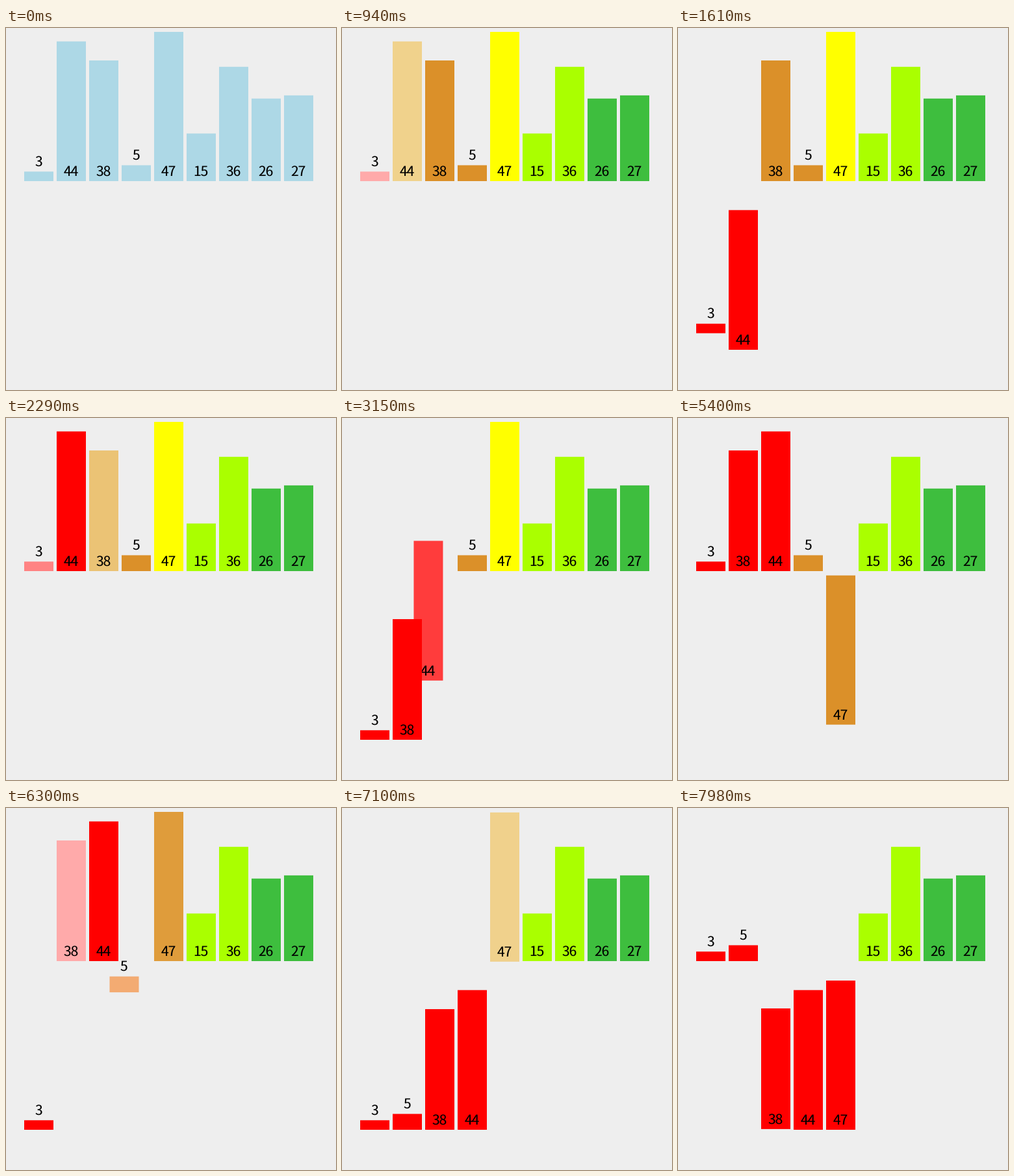
A matplotlib script that plays this animation: 508x558 px, repeating every 8 s.

```python
import numpy as np
import matplotlib.pyplot as plt
from matplotlib.animation import FuncAnimation
from matplotlib.patches import Rectangle

W, H, DPI = 508, 558, 100
LOOP, STEP = 8000, 20
START, MOVE = 345, 292.5  # ms: first transition, length of each transition

BLUE, RED, ORANGE = (173, 216, 230), (255, 0, 0), (219, 144, 41)
YELLOW, LIME, GREEN = (255, 255, 0), (170, 255, 0), (62, 190, 62)
PALE = {RED: (255, 170, 170), ORANGE: (240, 210, 140)}

VALUES = [3, 44, 38, 5, 47, 15, 36, 26, 27]
GROUPS = [RED] + 3 * [ORANGE] + [YELLOW] + 2 * [LIME] + 2 * [GREEN]
BASE, DROP = 236, 260
PITCH, BAR, UNIT = 50, 45, 230 / max(VALUES)

order = list(VALUES)
pose = {v: [slot, 0, BLUE] for slot, v in enumerate(VALUES)}
poses = []


def snapshot():
    poses.append(np.array([[slot, drop, *tone] for slot, drop, tone in pose.values()], float))


def merge(lo, mid, hi):
    tone = pose[order[lo]][2]
    left, right = order[lo:mid], order[mid:hi]

    def highlight():
        for side in (left, right):
            if side:
                head = pose[side[0]]
                head[2] = PALE.get(head[2], head[2])
        snapshot()

    highlight()
    for slot in range(lo, hi):
        take_left = not right or (left and left[0] <= right[0])
        v = (left if take_left else right).pop(0)
        order[slot] = v
        pose[v] = [slot, DROP, tone]
        highlight()
    for v in order[lo:hi]:
        pose[v][1] = 0
        snapshot()


def merge_sort(lo, hi):
    if hi - lo > 1:
        mid = (lo + hi + 1) // 2
        merge_sort(lo, mid)
        merge_sort(mid, hi)
        merge(lo, mid, hi)


snapshot()
for value, tone in zip(VALUES, GROUPS):
    pose[value][2] = tone
snapshot()
merge_sort(0, 5)


def ease(t):
    return 4 * t ** 3 if t < 0.5 else 1 - 4 * (1 - t) ** 3


def shown_time(ms):
    """The picture stands still at first and in a few short pauses."""
    if ms < 500:
        return 0
    for pause in (680, 940, 2100, 4240, 4980, 5810):
        if pause <= ms < pause + 135:
            return pause
    return ms


def pose_at(ms):
    phase = max(0, (shown_time(ms) - START) / MOVE)
    k = int(phase)
    return poses[k] + (poses[k + 1] - poses[k]) * ease(phase - k)


plt.rcParams.update({"font.family": "Noto Sans CJK JP", "text.hinting": "none"})
fig = plt.figure(figsize=(W / DPI, H / DPI), dpi=DPI, facecolor="#eeeeee")
ax = fig.add_axes([0, 0, 1, 1])
ax.set(xlim=(0, W), ylim=(H, 0))
ax.axis("off")

bars, labels = [], []
for z, value in enumerate(VALUES):
    bar = Rectangle((0, 0), BAR, value * UNIT, linewidth=0, snap=False, zorder=2 + z)
    bars.append(ax.add_patch(bar))
    labels.append(ax.text(0, 0, str(value), fontsize=21 * 72 / DPI, color="black",
                          ha="center", va="baseline", zorder=2.5 + z))


def draw(i):
    for bar, label, (slot, drop, *tone) in zip(bars, labels, pose_at(i * STEP)):
        x, bottom = 28 + PITCH * slot, BASE + drop
        height = bar.get_height()
        bar.set_xy((x, bottom - height))
        bar.set_facecolor(np.clip(np.array(tone) / 255, 0, 1))
        label_y = bottom - 8 if height > 30 else bottom - height - 9
        label.set_position((x + 22, label_y))
    return bars + labels


anim = FuncAnimation(fig, draw, frames=LOOP // STEP, interval=STEP,
                     repeat=True, repeat_delay=0)
plt.show()
```
